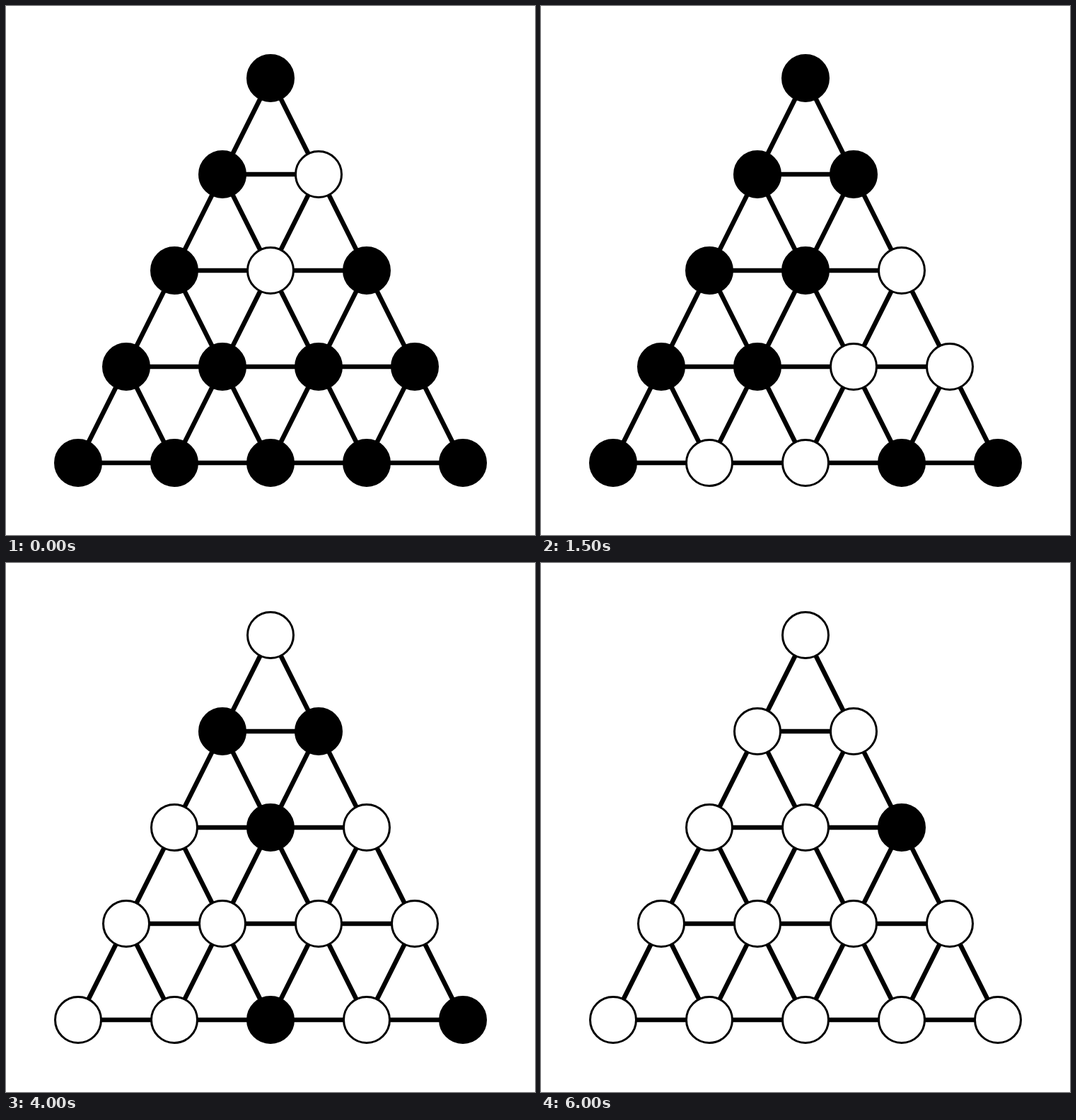
Animation, 748 px wide and 748 px high, one loop 6500 ms. Source, as an HTML page:

```html
<!DOCTYPE html>
<html lang="en">
<head>
<meta charset="utf-8">
<title>Triangular peg solitaire</title>
<style>
  html, body { margin: 0; width: 100%; height: 100%; overflow: hidden; background: #fff; }
  svg { display: block; width: 100%; height: 100%; }
  line { stroke: #000; stroke-width: 6.5; }
  circle { stroke: #000; stroke-width: 3; }
</style>
</head>
<body>
<svg viewBox="0 0 748 748"></svg>
<script>
const STEP = 500;
const ROWS = 5;
const START_EMPTY = [2, 4];
// Each jump: from, over, to. Holes are numbered row by row from the top.
const JUMPS = [
  [13, 8, 4], [11, 12, 13], [9, 5, 2], [3, 7, 12], [0, 1, 3], [13, 12, 11],
  [10, 11, 12], [6, 3, 1], [1, 4, 8], [12, 8, 5], [2, 5, 9], [14, 9, 5]
];

const svg = document.querySelector("svg");

function add(tag, attributes) {
  const element = document.createElementNS("http://www.w3.org/2000/svg", tag);
  for (const name in attributes) element.setAttribute(name, attributes[name]);
  return svg.appendChild(element);
}

const holeAt = (row, col) => ({ x: 374 + 136 * col - 68 * row, y: 102 + 136 * row });

function connect(a, b) {
  add("line", { x1: a.x, y1: a.y, x2: b.x, y2: b.y });
}

const holes = [];
for (let row = 0; row < ROWS; row++) {
  for (let col = 0; col <= row; col++) {
    const hole = holeAt(row, col);
    holes.push(hole);
    if (col < row) connect(hole, holeAt(row, col + 1));
    if (row < ROWS - 1) {
      connect(hole, holeAt(row + 1, col));
      connect(hole, holeAt(row + 1, col + 1));
    }
  }
}
const circles = holes.map(({ x, y }) => add("circle", { cx: x, cy: y, r: 32.5 }));

// A jump toggles all three of its holes.
function boardAfter(count) {
  const filled = holes.map((_, i) => !START_EMPTY.includes(i));
  for (const i of JUMPS.slice(0, count).flat()) filled[i] = !filled[i];
  return filled;
}

function draw() {
  const step = Math.floor(performance.now() / STEP) % (JUMPS.length + 1);
  boardAfter(step).forEach((filled, i) => circles[i].setAttribute("fill", filled ? "#000" : "#fff"));
  requestAnimationFrame(draw);
}
draw();
</script>
</body>
</html>
```
